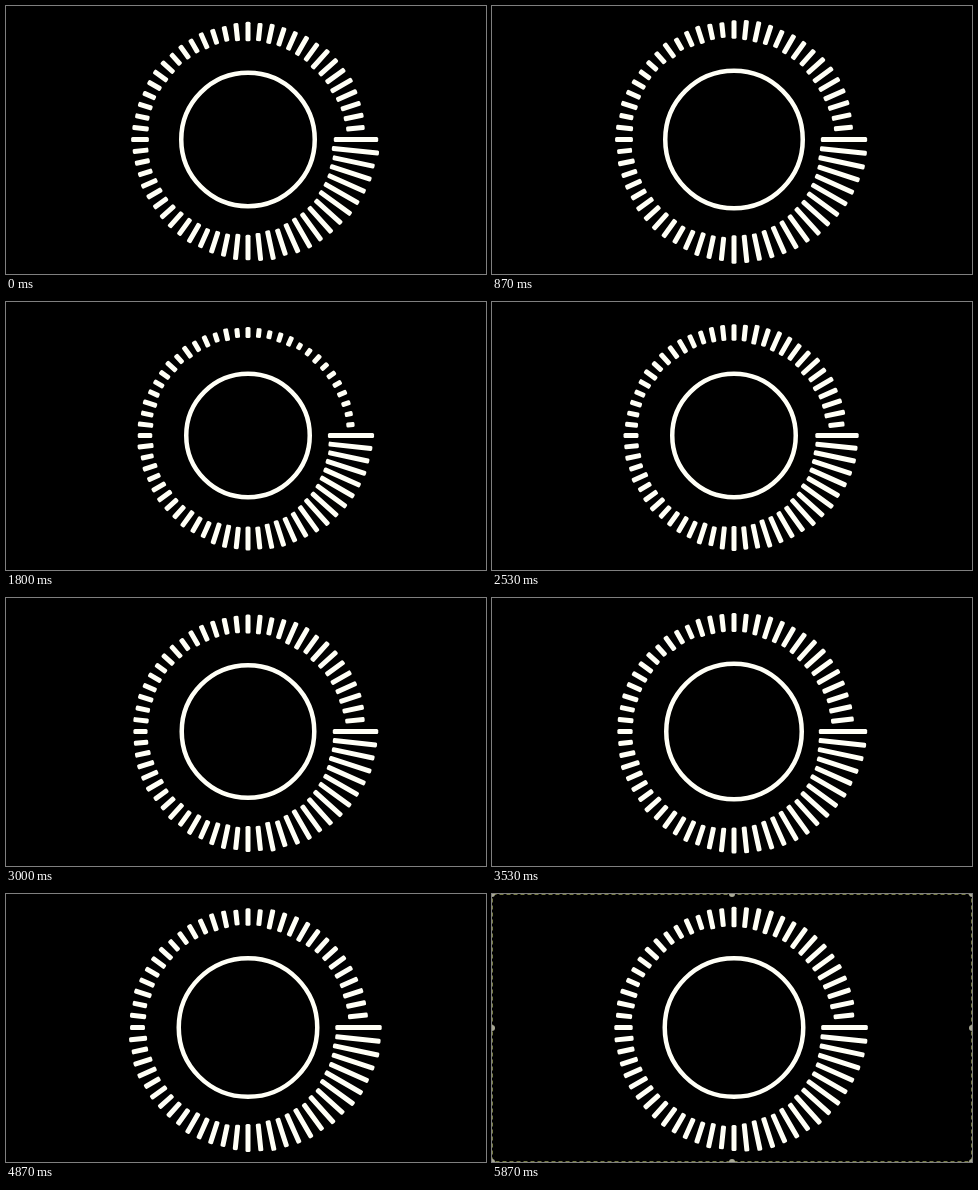
Write an HTML page with a canvas that moves like this. It is 480x268 px and loops after 5940 ms.

```html
<!DOCTYPE html>
<html lang="en">
<head>
<meta charset="utf-8">
<title>Circular spectrum</title>
<style>
  html, body { margin: 0; width: 100%; height: 100%; overflow: hidden; background: #000; }
  canvas { display: block; width: 100vw; height: 100vh; }
</style>
</head>
<body>
<canvas id="stage" width="480" height="268"></canvas>
<script>
const ctx = document.getElementById("stage").getContext("2d");
const W = 480, H = 268, CX = 242, CY = 133.5;
const LOOP = 5940, STEP = 200 / 3, LAST = 88;
const BARS = 60, BEAT = 6, BORDER_FROM = 77;
const QUIET = 64, LOUD = 71.5;

// Outer ring radius and strength of the high bands along the loop.
const keys = [
  { at: 0, radius: 69, highs: 10 },
  { at: 13, radius: 71, highs: 8 },
  { at: 27, radius: 64, highs: -3 },
  { at: 38, radius: 64, highs: 10 },
  { at: 53, radius: 70, highs: 11 },
  { at: 73, radius: 71.5, highs: 6 },
  { at: LAST, radius: 71.5, highs: 11 }
];

const mix = (a, b, k) => a + (b - a) * k;

function noise(a, b) {
  const n = Math.sin(a * 12.9898 + b * 78.233) * 43758.5453;
  return (n - Math.floor(n)) * 2 - 1;
}

// Between keys the ring beats from its level to the opposite one and back.
function soundAt(tick) {
  const i = Math.min(keys.findLastIndex(p => p.at <= tick), keys.length - 2);
  const a = keys[i], b = keys[i + 1], span = b.at - a.at;
  const k = (tick - a.at) / span;
  const level = mix(a.radius, b.radius, k);
  const swell = Math.sin(Math.PI * Math.round(span / BEAT) * k) ** 2;
  return {
    radius: mix(level, QUIET + LOUD - level, swell),
    highs: mix(a.highs, b.highs, k)
  };
}

// Bars run clockwise from the right: strong bass, flat middle, a hump of highs.
function barLength(bar, tick, { radius, highs }) {
  const base = 13 + (radius - 68) * 0.4;
  const bass = 33 * Math.exp(-((bar / 15) ** 1.4));
  const hump = highs * Math.exp(-(((bar - 53) / 9) ** 2));
  return Math.max(3, base + bass + hump + 2 * noise(bar, tick));
}

function drawBar(bar, mid, length) {
  ctx.save();
  ctx.rotate(bar * 2 * Math.PI / BARS);
  ctx.beginPath();
  ctx.roundRect(mid - length / 2, -2.5, length, 5, 1.5);
  ctx.fill();
  ctx.restore();
}

function drawBorder() {
  ctx.strokeStyle = "#757a45";
  ctx.lineWidth = 1;
  ctx.setLineDash([4, 3]);
  ctx.strokeRect(0.5, 0.5, W - 1, H - 1);
  ctx.setLineDash([]);
  ctx.fillStyle = "#a8a894";
  for (let n = 0; n < 9; n++) {
    if (n === 4) continue;
    ctx.beginPath();
    ctx.arc(n % 3 * W / 2, Math.floor(n / 3) * H / 2, 3, 0, 2 * Math.PI);
    ctx.fill();
  }
}

function draw(tick) {
  const sound = soundAt(tick);
  ctx.fillStyle = "#000";
  ctx.fillRect(0, 0, W, H);
  ctx.save();
  ctx.translate(CX, CY);
  ctx.strokeStyle = ctx.fillStyle = "#fffff6";
  ctx.lineWidth = 4.5;
  ctx.beginPath();
  ctx.arc(0, 0, sound.radius - 2.25, 0, 2 * Math.PI);
  ctx.stroke();
  for (let bar = 0; bar < BARS; bar++) {
    drawBar(bar, sound.radius + 39, barLength(bar, tick, sound));
  }
  ctx.restore();
  if (tick >= BORDER_FROM) drawBorder();
}

const start = performance.now();
let shown = -1;
function loop() {
  const t = (performance.now() - start) % LOOP;
  const tick = Math.min(LAST, Math.floor((t + 5) / STEP));
  if (tick !== shown) draw(shown = tick);
  requestAnimationFrame(loop);
}
loop();
</script>
</body>
</html>
```
